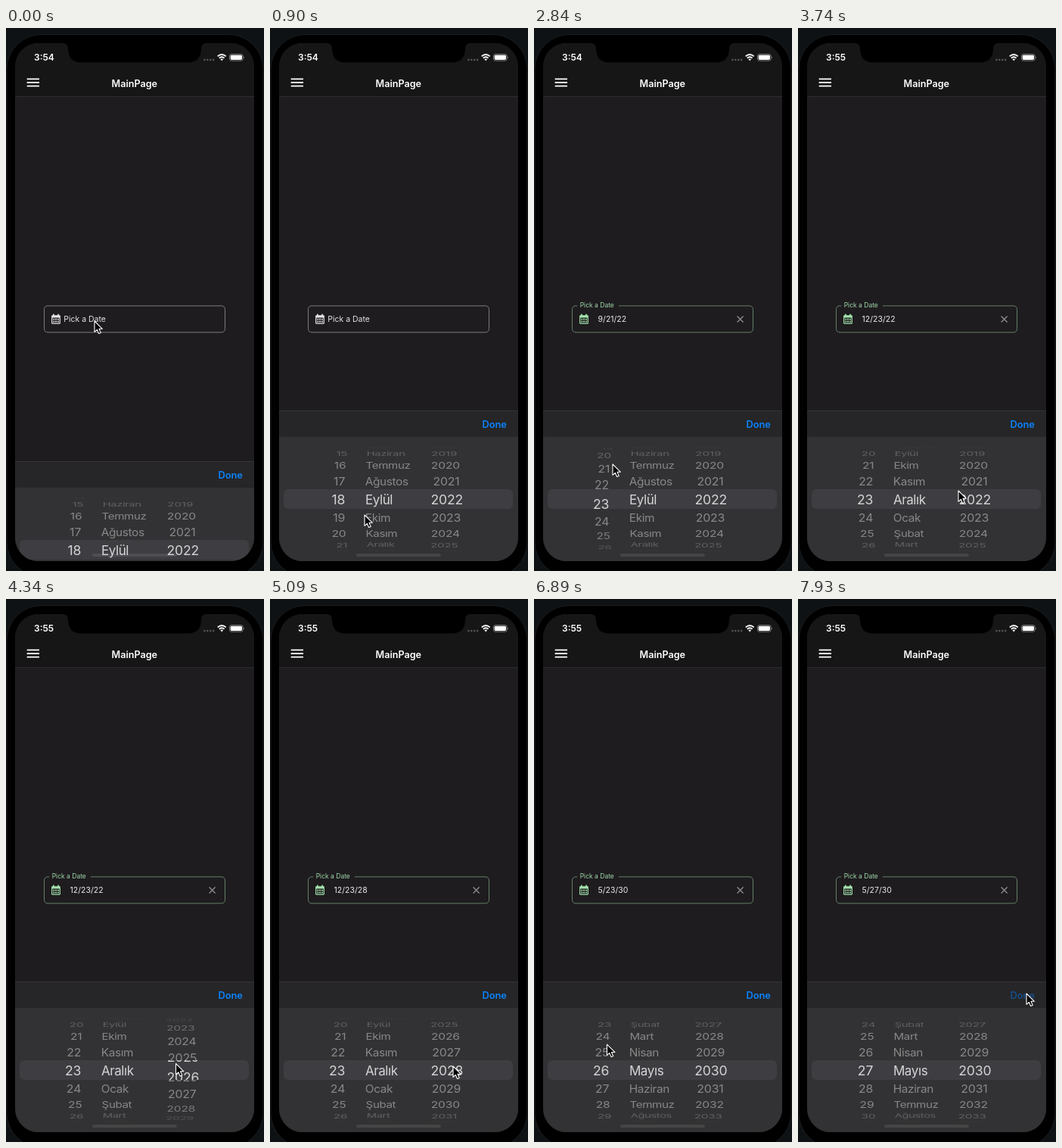
Recreate the animation shown at these times as an HTML page. Size 341 by 717 pixels, loop 8000 ms.

```html
<!DOCTYPE html>
<html lang="en">
<head>
<meta charset="utf-8">
<title>Date picker</title>
<style>
html, body { margin: 0; height: 100%; overflow: hidden; background: #0e1215; }
svg { display: block; width: 341px; height: 717px; }
text { font-family: Inter, "Open Sans", sans-serif; fill: #fff; white-space: pre; }
.bold { font-weight: 600; }
.field { font-size: 10.5px; }
.wheel text { letter-spacing: -0.01em; }
.wheel .month { letter-spacing: -0.025em; }
</style>
</head>
<body>
<svg viewBox="0 0 341 717">
  <defs>
    <clipPath id="screen"><rect x="12" y="20" width="316" height="684" rx="31"/></clipPath>
    <clipPath id="outer"><path d="M12 541H328V609H12ZM12 635H328V704H12Z"/></clipPath>
    <clipPath id="band"><path d="M12 609H328V635H12Z"/></clipPath>
  </defs>
  <rect width="341" height="717" fill="#0e1215"/>
  <rect x="1" y="8.5" width="339" height="716" rx="46" fill="#000" stroke="#1b1d1f"/>

  <g clip-path="url(#screen)">
    <rect x="12" y="20" width="316" height="684" fill="#1e1c1f"/>
    <rect x="12" y="20" width="316" height="70" fill="#161616"/>
    <rect x="12" y="90" width="316" height="1" fill="#2c2c2e"/>
    <path d="M27.7 67.4H44M27.7 72H44M27.7 76.6H44" stroke="#fff" stroke-width="1.9"/>
    <text class="bold" x="169.8" y="78" font-size="12.6" text-anchor="middle">MainPage</text>
    <text class="bold" id="clock" x="37" y="43.4" font-size="12"></text>

    <path d="M262.4 42h12" stroke="#5c5c5e" stroke-width="2.4" stroke-linecap="round" stroke-dasharray="0 3.9"/>
    <g fill="none" stroke="#fff" stroke-width="1.8">
      <path d="M279.7 37.4Q285.2 32.6 290.7 37.4M281.9 39.7Q285.2 36.8 288.5 39.7"/>
      <path d="M283.4 41.4Q285.2 39.8 287 41.4L285.2 43.2Z" fill="#fff" stroke="none"/>
    </g>
    <rect x="295.5" y="34.6" width="17.6" height="8.6" rx="2.4" fill="none" stroke="#8a8a8a" stroke-width=".9"/>
    <rect x="296.7" y="35.8" width="15.2" height="6.2" rx="1.4" fill="#fff"/>
    <path d="M314.2 37.4Q316 38.9 314.2 40.4Z" fill="#8a8a8a"/>

    <g id="empty">
      <rect x="50.5" y="366.9" width="239" height="35" rx="4.5" fill="none" stroke="#7d7c7f"/>
      <text class="field" x="76.2" y="388.2" fill-opacity=".88">Pick a Date</text>
    </g>
    <g id="filled">
      <path d="M112 366.9H285a4.5 4.5 0 0 1 4.5 4.5V397.4a4.5 4.5 0 0 1 -4.5 4.5H55a4.5 4.5 0 0 1 -4.5 -4.5V371.4a4.5 4.5 0 0 1 4.5 -4.5H57" fill="none" stroke="#648169"/>
      <text x="60.7" y="368.6" font-size="8.5" style="fill:#9fd8a8">Pick a Date</text>
      <text class="field" id="value" x="84.6" y="388.2" fill-opacity=".9"></text>
      <path d="M268.6 380.4l8 8m0 -8l-8 8" stroke="#8a898c" stroke-width="1.4"/>
    </g>
    <g id="icon" fill="currentColor">
      <path fill-rule="evenodd" d="M62 377.8h1.8v1.4h4.4v-1.4h1.8v1.4h.6a1.3 1.3 0 0 1 1.3 1.3v9a1.3 1.3 0 0 1 -1.3 1.3H61.4a1.3 1.3 0 0 1 -1.3 -1.3v-9a1.3 1.3 0 0 1 1.3 -1.3h.6ZM61.3 382.4v7.2h9.4v-7.2Z"/>
      <path d="M62.4 384.6h7.4M62.4 387.6h7.4" stroke="currentColor" stroke-width="1.6" stroke-dasharray="1.8 1"/>
    </g>

    <g id="sheet">
      <rect x="12" y="505" width="316" height="36" fill="#262628"/>
      <rect x="12" y="505" width="316" height="1" fill="#343436"/>
      <rect x="12" y="540" width="316" height="180" fill="#323234"/>
      <text class="bold" id="done" x="280.4" y="527.5" font-size="12.8"></text>
      <rect x="18" y="609" width="303" height="26" rx="6" fill="#3e3e42"/>
      <g class="wheel" id="rows" clip-path="url(#outer)"></g>
      <g class="wheel" id="picked" clip-path="url(#band)"></g>
    </g>
    <rect x="114" y="694" width="112" height="4" rx="2" fill="#fff" fill-opacity=".09"/>
  </g>

  <path d="M74 19.5Q82 20 82 27Q82 45.5 100 45.5H240Q258 45.5 258 27Q258 20 266 19.5Z" fill="#000"/>
  <path id="cursor" d="M0 0V14.3L3.3 11.3L5.6 16.5L8.2 15.4L6 10.3H10.4Z" fill="#000" stroke="#fff" stroke-width="1.1" stroke-linejoin="round"/>
</svg>

<script>
const LOOP = 8000, BEAT = 149.4;
const MID = 622.5, RADIUS = 68.7, TURN = 20.4 * Math.PI / 180, DEPTH = 680, AXIS = 170;
const MONTHS = 'Ocak Şubat Mart Nisan Mayıs Haziran Temmuz Ağustos Eylül Ekim Kasım Aralık'.split(' ');
const $ = id => document.getElementById(id);
const mod = (n, m) => ((n % m) + m) % m;
const clamp = v => Math.min(1, Math.max(0, v));
const easeOut = u => 1 - (1 - u) ** 2;
const easeInOut = u => u * u * (3 - 2 * u);

// Times are in beats: the picture advances once per beat.
// Swipes of the wheels: column, first beat, last beat, rows moved
const SWIPES = [
  ['day', 8, 12, 3], ['day', 15, 21, 2], ['month', 22, 25, 3], ['year', 26, 34, 6],
  ['year', 36, 38, 2], ['month', 38, 40, 2], ['month', 41, 44, 3], ['day', 44, 48, 4]
];
// Pointer stops: beat, x, y
const STOPS = [
  [1, 117, 387], [6, 125, 643], [10, 95, 640], [19, 104, 576], [22, 142, 640], [25, 212, 611],
  [34, 242, 617], [40, 130, 660], [44, 92, 640], [47, 98, 570], [50, 311, 522], [53, 302, 521]
];

function pointer(b) {
  const i = Math.max(1, STOPS.findIndex(s => s[0] >= b));
  const [b0, x0, y0] = STOPS[i - 1], [b1, x1, y1] = STOPS[i];
  const u = easeInOut(clamp((b - b0) / (b1 - b0)));
  return [x0 + (x1 - x0) * u, y0 + (y1 - y0) * u];
}

function makeRows(parent, reach, size, name, anchor) {
  return Array.from({ length: 2 * reach + 1 }, (_, i) => {
    const el = document.createElementNS('http://www.w3.org/2000/svg', 'text');
    const attrs = { class: name, 'font-size': size, 'text-anchor': anchor, y: size * 0.364 };
    for (const a in attrs) el.setAttribute(a, attrs[a]);
    parent.append(el);
    return { k: i - reach, el };
  });
}

const column = (name, first, x, anchor, size, label) => ({
  name, first, x, label,
  swipes: SWIPES.filter(s => s[0] === name),
  rows: makeRows($('rows'), 4, size, name, anchor),
  picked: makeRows($('picked'), 1, size * 1.1, name, anchor)
});
const columns = [
  column('day', 18, 98.8, 'end', 16, n => mod(n - 1, 31) + 1),
  column('month', 9, 125.5, 'start', 15.5, n => MONTHS[mod(n - 1, 12)]),
  column('year', 2022, 233.4, 'middle', 16, n => n)
];

const position = (c, b) =>
  c.swipes.reduce((p, [, from, to, n]) => p + n * easeOut(clamp((b - from) / (to - from))), c.first);
const settled = (c, b) =>
  c.swipes.reduce((p, [, , to, n]) => p + (b >= to ? n : 0), c.first);

function drawColumn(c, b) {
  const pos = position(c, b), base = Math.round(pos);
  for (const { k, el } of c.rows) {
    const d = base + k - pos, a = d * TURN, cos = Math.cos(a);
    const p = DEPTH / (DEPTH + RADIUS * (1 - cos));
    el.textContent = c.label(base + k);
    el.setAttribute('transform',
      `translate(${AXIS + (c.x - AXIS) * p} ${MID + RADIUS * Math.sin(a)}) scale(${p} ${Math.max(cos, 0.02)})`);
    el.setAttribute('fill-opacity', clamp(0.42 - 0.19 * Math.max(0, Math.abs(d) - 2)));
  }
  for (const { k, el } of c.picked) {
    const a = (base + k - pos) * TURN;
    el.textContent = c.label(base + k);
    el.setAttribute('transform',
      `translate(${c.x + 0.4} ${MID + 1.1 * RADIUS * Math.sin(a)}) scale(1 ${Math.cos(a)})`);
    el.setAttribute('fill-opacity', 0.78);
  }
}

function draw(time) {
  const b = Math.floor(time / BEAT);
  columns.forEach(c => drawColumn(c, b));
  $('sheet').setAttribute('transform', `translate(0 ${67 * Math.exp(-1.6 * b)})`);
  $('cursor').setAttribute('transform', `translate(${pointer(b)})`);
  $('clock').textContent = b < 24 ? '3:54' : '3:55';
  $('done').style.fill = b < 53 ? '#0a84ff' : '#154f8b';

  const [day, month, year] = columns.map(c => settled(c, b));
  const chosen = day !== columns[0].first;
  $('value').textContent = `${mod(month - 1, 12) + 1}/${day}/${year % 100}`;
  $('filled').style.display = chosen ? '' : 'none';
  $('empty').style.display = chosen ? 'none' : '';
  $('icon').style.color = chosen ? '#a3e3ad' : '#e4e3e5';
}

$('done').textContent = 'Done';
const start = performance.now();
function tick() {
  draw((performance.now() - start) % LOOP);
  requestAnimationFrame(tick);
}
tick();
</script>
</body>
</html>
```
